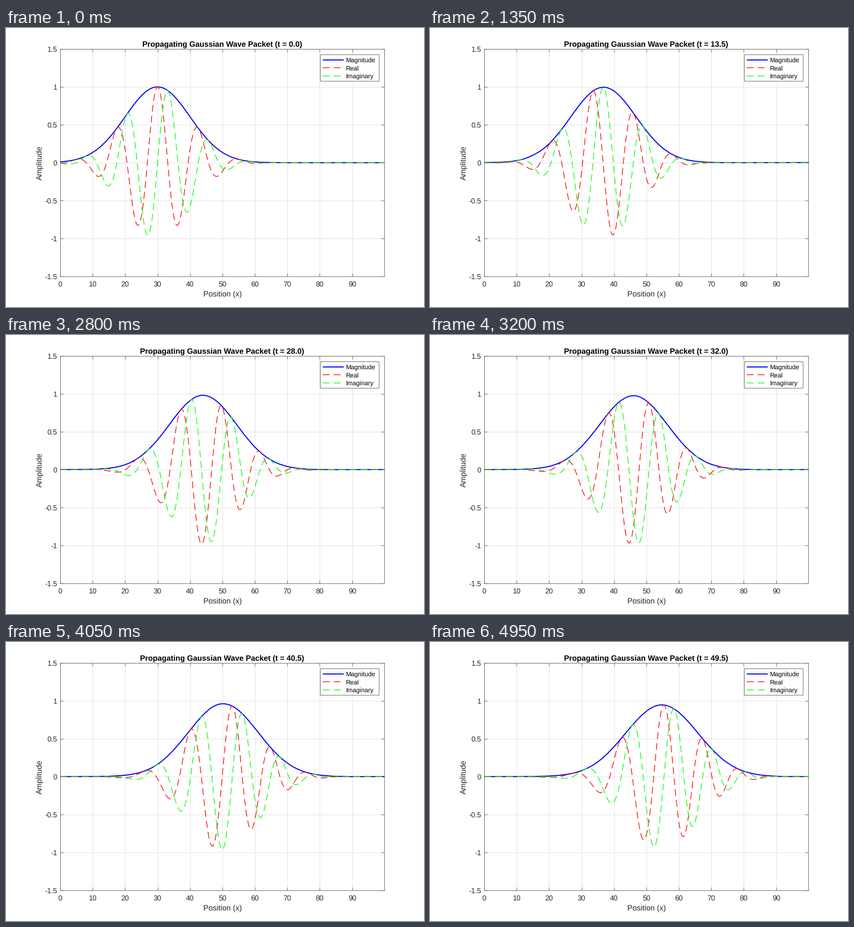
A matplotlib script that plays this animation: 917x611 px, repeating every 5000 ms.

```python
import numpy as np
import matplotlib.pyplot as plt
from matplotlib.animation import FuncAnimation
from matplotlib.patches import Rectangle

W, H, DPI = 917, 611, 100
LEFT, RIGHT, TOP, BOTTOM = 119, 830, 46, 544
FRAMES, INTERVAL, DT = 100, 50, 0.5
INK = "#262626"
PX = 72 / DPI  # points per pixel
HAIR = 0.75 * PX

plt.rcParams["font.family"] = "Liberation Sans"
plt.rcParams["text.hinting"] = "no_hinting"
plt.rcParams["path.simplify"] = False

# Free Gaussian packet on a periodic grid
N, L = 1024, 100.0
X0, SIGMA, K0 = 30.0, 10.0, 0.5
x = np.arange(N) * L / N
k = 2 * np.pi * np.fft.fftfreq(N, L / N)
spectrum = np.fft.fft(np.exp(-(x - X0) ** 2 / (2 * SIGMA ** 2) + 1j * K0 * (x - X0)))


def packet(t):
    return np.fft.ifft(spectrum * np.exp(-0.5j * k ** 2 * t))


fig = plt.figure(figsize=(W / DPI, H / DPI), dpi=DPI, facecolor="white")

ax = fig.add_axes([LEFT / W, 1 - BOTTOM / H, (RIGHT - LEFT) / W, (BOTTOM - TOP) / H])
ax.set_xlim(0, x[-1])
ax.set_ylim(-1.5, 1.5)
ax.set_xticks(range(0, 100, 10))
ax.set_yticks(np.arange(-1.5, 1.6, 0.5))
ax.tick_params(direction="in", length=7 * PX, width=HAIR, color=INK, top=True,
               right=True, labelbottom=False, labelleft=False)
ax.grid(color="#dedede", linewidth=PX)
ax.set_axisbelow(True)
for spine in ax.spines.values():
    spine.set(color=INK, linewidth=HAIR)

# Overlay measured in pixels from the top left corner
page = fig.add_axes([0, 0, 1, 1])
page.set_xlim(0, W)
page.set_ylim(H, 0)
page.axis("off")


def label(px, py, text, size, color=INK, **kw):
    return page.text(px, py, text, fontsize=size * PX, color=color,
                     va="baseline", **kw)


for v in range(0, 100, 10):
    label(LEFT + (RIGHT - LEFT) * v / x[-1], 566, str(v), 15.6, ha="center")
for v in np.arange(-1.5, 1.6, 0.5):
    py = BOTTOM - (BOTTOM - TOP) * (v + 1.5) / 3
    label(112.5, py + 6, f"{v:g}", 15.6, ha="right")
label(475, 587, "Position (x)", 16.9, ha="center")
label(78, 295, "Amplitude", 16.9, rotation=90, rotation_mode="anchor", ha="center")
title = label(474.5, 40, "", 16.9, "black", weight="bold", ha="center")

DASH = (0, (10, 6))
STYLES = [
    ("Magnitude", dict(color="#0000ff", linewidth=2.25 * PX, linestyle="-")),
    ("Real", dict(color="#ff0000", linewidth=1.5 * PX, linestyle=DASH)),
    ("Imaginary", dict(color="#00ff00", linewidth=1.5 * PX, linestyle=DASH)),
]

page.add_patch(Rectangle((689, 58), 129, 58, facecolor="white",
                         edgecolor=INK, linewidth=HAIR))
curves = []
for i, (name, style) in enumerate(STYLES):
    py = 70 + 17.4 * i
    page.plot([695, 741], [py, py], dash_capstyle="butt",
              solid_capstyle="butt", **style)
    label(745.5, py + 5, name, 13.9, "black", ha="left")
    curves += ax.plot(x, np.zeros(N), dash_capstyle="butt", **style)


def update(frame):
    t = frame * DT
    psi = packet(t)
    for curve, values in zip(curves, (np.abs(psi), psi.real, psi.imag)):
        curve.set_ydata(values)
    title.set_text(f"Propagating Gaussian Wave Packet (t = {t:.1f})")
    return curves + [title]


anim = FuncAnimation(fig, update, frames=FRAMES, interval=INTERVAL,
                     repeat=True, repeat_delay=0)
plt.show()
```
